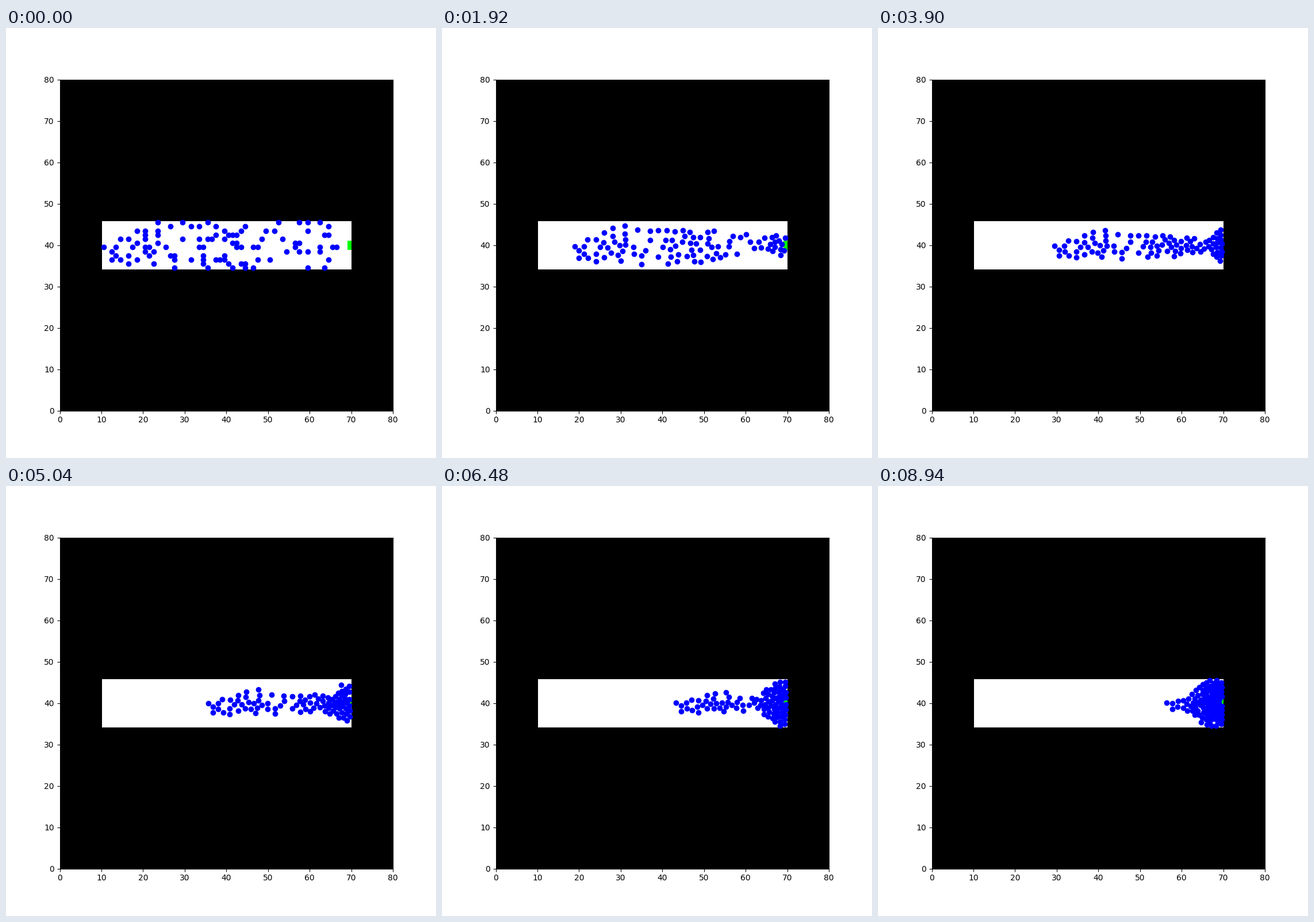
These frames come from a looping animation (748 by 748 pixels, 9 s). A matplotlib script:

```python
import numpy as np
import matplotlib.pyplot as plt
from matplotlib.animation import FuncAnimation
from matplotlib.patches import Rectangle

FRAMES, INTERVAL = 150, 60
SUBSTEPS = 8
SPEED = 0.326            # preferred speed, units per frame
TAU = 9.2                # relaxation time, frames
RANGE = 0.08             # decay length of the repulsion
PAIR, WALL = 0.13, 0.11  # repulsion at distance 1 and at 0.5 from a wall
LEFT, RIGHT, LOW, HIGH = 10, 70, 34, 46
TARGET = np.array([70.0, 40.0])
DOOR_REACH, DOOR_WAIT = 0.75, 8

# Occupied cells at the start: row -> columns
CELLS = {
    45: (23, 29, 35, 52, 57, 59, 62),
    44: (26, 31, 33, 37, 44, 64),
    43: (18, 20, 23, 39, 43, 49, 51, 59),
    42: (20, 23, 37, 40, 41, 42, 63, 64),
    41: (14, 16, 20, 29, 33, 35, 36, 39, 48, 53),
    40: (18, 23, 41, 42, 56, 57),
    39: (10, 13, 17, 20, 21, 25, 33, 34, 42, 43, 46, 47, 56, 62, 65, 66),
    38: (12, 20, 22, 54, 57, 59, 62),
    37: (13, 16, 21, 26, 27, 34, 39),
    36: (12, 14, 18, 27, 31, 34, 37, 38, 39, 47, 50, 64),
    35: (16, 22, 34, 40, 43, 44),
    34: (27, 35, 41, 44, 46, 59, 63),
}


def push(dist, strength, ref):
    return strength * np.exp(np.minimum((ref - dist) / RANGE, 4))


def acceleration(pos, vel):
    to_door = TARGET - pos
    reach = np.linalg.norm(to_door, axis=1, keepdims=True)
    acc = (SPEED * to_door / np.maximum(reach, 1e-6) - vel) / TAU

    gap = pos[:, None] - pos[None]
    dist = np.linalg.norm(gap, axis=2)
    np.fill_diagonal(dist, 99)
    acc += (gap * (push(dist, PAIR, 1.0) / dist)[..., None]).sum(axis=1)

    x, y = pos.T
    acc[:, 0] += push(x - LEFT, WALL, 0.5) - push(RIGHT - x, WALL, 0.5)
    acc[:, 1] += push(y - LOW, WALL, 0.5) - push(HIGH - y, WALL, 0.5)
    return acc


def simulate():
    pos = np.array([(c + 0.5, r + 0.5) for r, cols in CELLS.items() for c in cols])
    vel = np.zeros_like(pos)
    path, ready = [pos.copy()], 0
    dt = 1 / SUBSTEPS
    for n in range(1, FRAMES):
        for _ in range(SUBSTEPS):
            vel = vel + acceleration(pos, vel) * dt
            pos = pos + vel * dt
        reach = np.linalg.norm(pos - TARGET, axis=1)
        first = reach.argmin()
        if n >= ready and reach[first] < DOOR_REACH:
            pos, vel = np.delete(pos, first, 0), np.delete(vel, first, 0)
            ready = n + DOOR_WAIT
        path.append(pos.copy())
    return path


def box(x0, y0, x1, y1, color):
    ax.add_patch(Rectangle((x0, y0), x1 - x0, y1 - y0, fc=color, lw=0))


path = simulate()

fig, ax = plt.subplots(figsize=(7.48, 7.48), dpi=100)
ax.set_facecolor("black")
ax.set_xlim(0, 80)
ax.set_ylim(0, 80)
box(10.14, 34.1, 70, 45.84, "white")
box(69.07, 38.85, 70, 41.07, "#00ff00")
crowd, = ax.plot([], [], "o", color="blue", ms=6, clip_on=False)


def draw(n):
    crowd.set_data(*path[n].T)
    return crowd,


anim = FuncAnimation(fig, draw, frames=FRAMES, interval=INTERVAL,
                     init_func=lambda: draw(0), repeat=True, repeat_delay=0)
plt.show()
```
